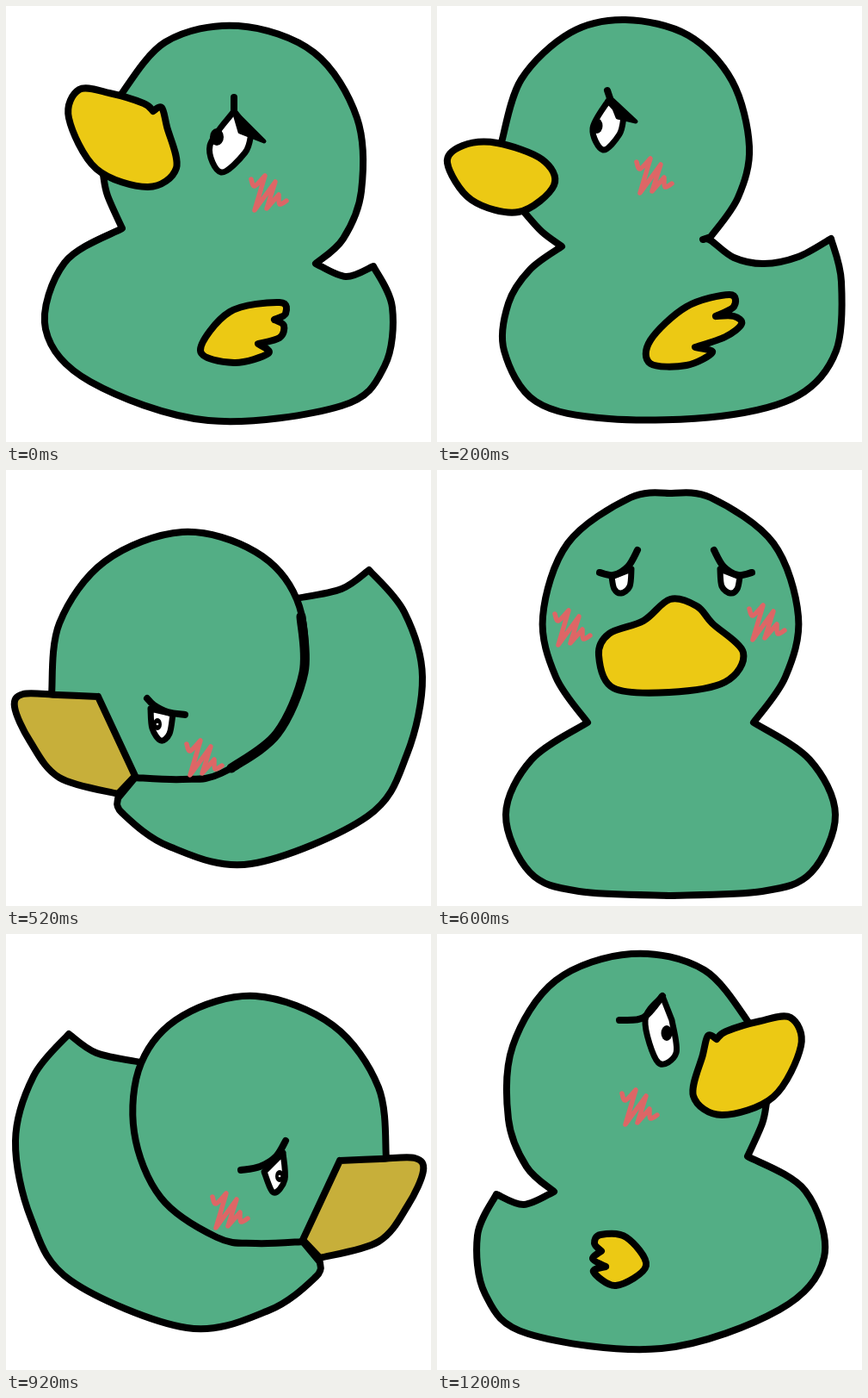
Write an HTML page that moves like this. It is 494 px wide and 506 px high and loops after 1.4 s.

```html
<!DOCTYPE html>
<html lang="en">
<head>
<meta charset="utf-8">
<title>Turning duck</title>
<style>
html, body { margin: 0; width: 100%; height: 100%; overflow: hidden; background: #fff; }
svg { display: block; width: 100%; height: 100%; }
path { stroke: #000; stroke-linecap: round; stroke-linejoin: round; }
</style>
</head>
<body>
<svg id="stage" viewBox="0 0 494 506"></svg>
<script>
const GREEN = '#53ae85', BRIGHT = '#3acb88', YELLOW = '#ecc914', OCHRE = '#c7af3a', PINK = '#dd6666';
const STEP = 200;

// Smooth curve through "x,y x,y"; "|" makes a corner, a final "z" closes the curve smoothly.
function curve(text) {
  const loop = text.endsWith('z');
  let last, d = '';
  for (const part of text.replace('z', '').split('|')) {
    const p = part.trim().split(/\s+/).map(s => s.split(',').map(Number));
    if (last) p.unshift(last);
    else d = 'M' + p[0];
    const n = p.length;
    const at = i => loop ? p[(i + n) % n] : p[Math.max(0, Math.min(n - 1, i))];
    for (let i = 0; i < (loop ? n : n - 1); i++) {
      const [a, b, c, e] = [at(i - 1), at(i), at(i + 1), at(i + 2)];
      const grip = (q, from, to) => q.map((v, k) => v + (to[k] - from[k]) / 6);
      d += `C${grip(b, a, c)} ${grip(c, e, b)} ${c}`;
    }
    last = p[n - 1];
  }
  return d + (loop ? 'Z' : '');
}

const shape = (fill, points, width = 8, ink = '#000') =>
  `<path d="${curve(points)}" fill="${fill}" style="stroke:${ink};stroke-width:${width}"/>`;
const line = (points, width = 8) => shape('none', points, width);
const eye = points => shape('#fff', points, 7);
const lid = points => shape('#000', points, 5);
const pupil = (x, y, rx = 6.5, ry = 9) => `<ellipse cx="${x}" cy="${y}" rx="${rx}" ry="${ry}"/>`;
const glint = (x, y) => pupil(x, y, 5, 7) + `<circle cx="${x}" cy="${y}" r="1.3" fill="#fff"/>`;
const move = (x, y, art) => `<g transform="translate(${x} ${y})">${art}</g>`;
const mirror = (width, art) => `<g transform="translate(${width} 0) scale(-1 1)">${art}</g>`;
const blush = (x, y) =>
  move(x, y, shape('none', '3,9 7,17 19,5 | 7,45 | 31,12 | 21,43 | 35,27 | 36,38 44,34', 5.5, PINK));

// The duck seen from its left side, from below and from above.
const level = fill =>
  shape(fill, `75,158 98,85 155,31 219,16 292,34 343,87 363,163 350,222 318,268 | 309,271 |
    318,272 345,292 380,299 420,291 458,270 | 470,320 464,400 420,452 330,476 200,479
    115,459 78,400 83,345 108,306 145,279 | 122,262 102,240`) +
  shape(YELLOW, '12,182 30,162 70,159 122,178 136,208 95,239 40,225z') +
  shape(YELLOW, `324,360 | 345,360 354,369 335,384 300,396 | 320,402 290,417 248,415 248,388
    290,349 340,335 345,349 324,360`);

const raised =
  shape(GREEN, `130,108 185,42 270,23 358,54 408,130 413,215 392,270 360,299 | 395,314 427,302 |
    449,350 440,418 390,464 235,481 98,436 46,375 68,298 135,258 | 118,220 113,196`) +
  shape(YELLOW, `171,122 | 160,113 120,101 85,97 73,130 105,189 165,210 198,188 187,140
    181,118 171,122`);

const lowered =
  shape(GREEN, `338,149 390,138 422,116 | 463,165 484,240 466,330 420,402 285,457 190,437
    135,398 130,381 | 150,357`) +
  shape(GREEN, `53,260 62,178 115,106 205,72 290,95 338,150 346,230 315,306 250,352 205,359
    148,357`) +
  shape(OCHRE, '107,263 | 150,355 | 130,376 | 62,357 28,315 10,275 20,260 60,261 107,263');

const frontHalf = shape(GREEN, `275,27 225,32 152,85 123,170 138,240 175,293 | 110,336 80,400
  108,467 165,489 275,494`);
const frontEye = eye('203,124 206,138 214,143 224,135 226,115 | 203,124') +
  line('189,119 205,122 222,112 233,93');

const poses = [
  raised +
  shape(YELLOW, `312,364 | 323,371 318,385 293,392 | 305,403 265,414 226,400 260,355 318,344
    325,357 312,364`) +
  eye('265,122 237,162 250,193 278,170 285,148 | 265,122') +
  pupil(245, 152, 8, 10) + line('265,106 265,122') + lid('265,122 | 300,157 | 272,146 | 265,122') +
  blush(282, 192),

  level(GREEN) +
  eye('199,110 181,142 193,167 212,149 217,129 | 199,110') +
  pupil(186, 139) + line('198,98 201,107') + lid('201,106 | 231,134 | 210,129 | 201,106') +
  blush(229, 172),

  lowered + line('343,170 346,235 315,306 262,346', 11) +
  eye('168,277 170,300 180,314 190,306 194,283 | 168,277') +
  glint(176, 295) + line('164,265 172,273 188,281 208,284') +
  blush(207, 309),

  frontHalf + mirror(543, frontHalf) +
  shape(YELLOW, `188,215 200,190 240,175 271,150 302,158 320,178 356,212 335,246 270,258
    205,253z`) +
  frontEye + mirror(555, frontEye) +
  blush(134, 158) + blush(360, 152),

  mirror(495, lowered) +
  eye('322,254 324,285 311,300 300,276 | 322,254') +
  glint(318, 281) + line('273,274 295,270 314,258 325,240') +
  blush(237, 296),

  mirror(494, level(BRIGHT)) +
  eye('330,116 342,149 355,152 362,125 354,97 | 330,116') +
  pupil(355, 125) + line('304,102 320,108 338,107 354,96') +
  blush(266, 174),

  mirror(496, raised) +
  shape(YELLOW, `196,386 | 182,392 208,408 243,385 220,352 190,349 183,359 191,368 |
    181,377 196,386`) +
  eye('262,72 242,100 257,149 278,138 273,100 | 262,72') +
  pupil(267, 115) + line('212,100 240,97 262,72') +
  blush(212, 176)
];

const stage = document.getElementById('stage');
stage.innerHTML = poses.map(art => `<g>${art}</g>`).join('');
const groups = [...stage.children];
const start = performance.now();

function draw(now) {
  const current = Math.floor(Math.max(0, now - start) / STEP) % groups.length;
  groups.forEach((g, i) => g.setAttribute('display', i === current ? 'inline' : 'none'));
  requestAnimationFrame(draw);
}
draw(start);
</script>
</body>
</html>
```
